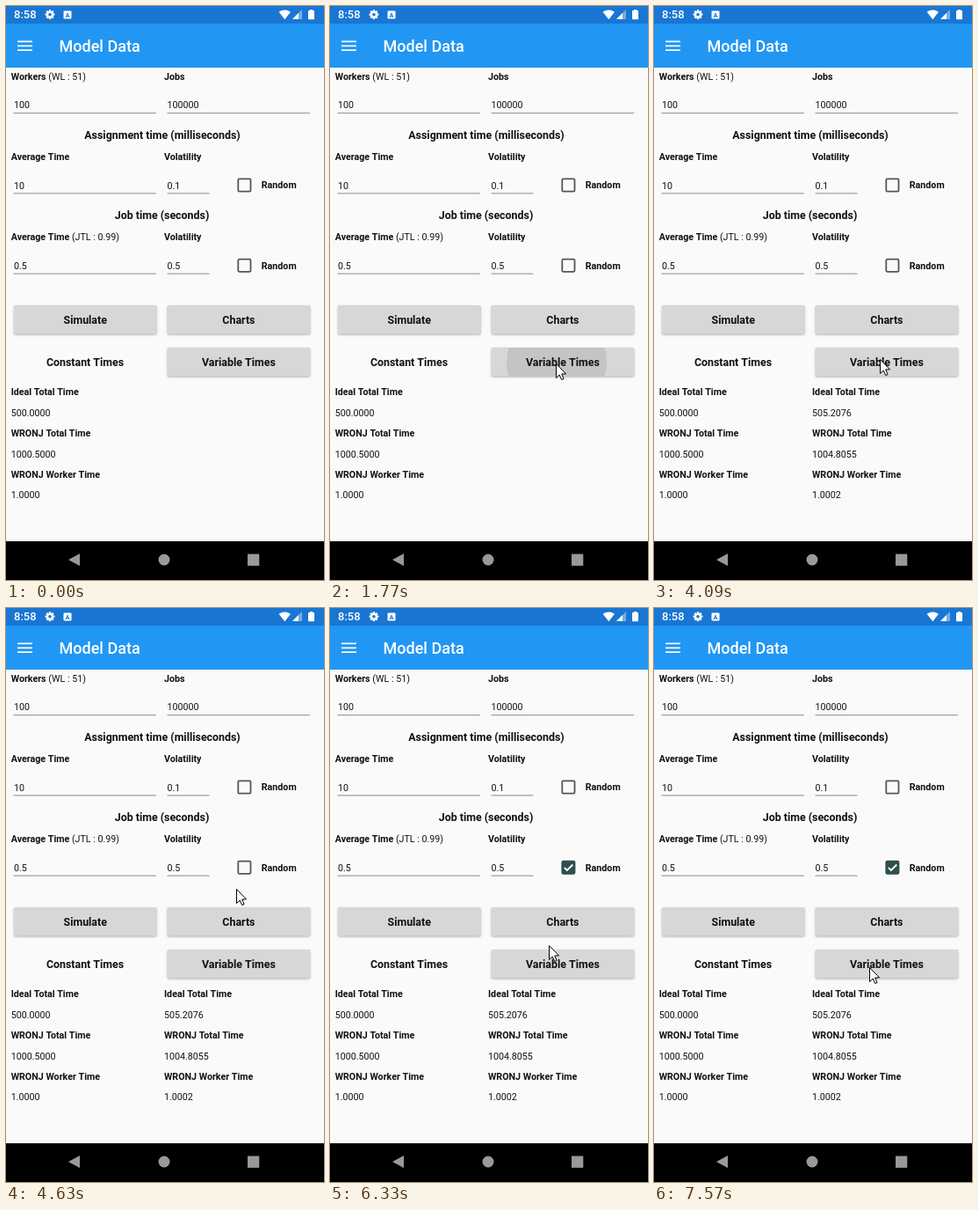
An HTML page with a canvas for the animation above (8 s loop, 362x652 px).

```html
<!DOCTYPE html>
<html lang="en">
<head>
<meta charset="utf-8">
<title>Model Data</title>
<style>
  html, body { margin: 0; width: 100%; height: 100%; overflow: hidden; background: #fafafa; }
  canvas { display: block; width: 362px; height: 652px; }
</style>
</head>
<body>
<canvas id="stage" width="362" height="652"></canvas>
<script>
const ctx = document.getElementById('stage').getContext('2d');
const LOOP = 8000;
const STEP = 77;
const INK = '#111';
const SMALL = 10.7, LARGE = 12.4;

// Pointer moves: start time, then [time, x, y] points sampled once per STEP.
const MOVES = [
  { start: 590, keys: [[590, 338, 358], [740, 307, 374], [900, 272, 396], [1050, 257, 406]] },
  { start: 4090, keys: [[4013, 257, 406], [4170, 256, 395], [4400, 257, 362], [4630, 262, 319], [4860, 269, 293]] },
  { start: 4940, keys: [[4940, 270, 291]] },
  { start: 5710, keys: [[5640, 270, 291], [5870, 267, 308], [6020, 262, 334], [6172, 254, 360], [6410, 247, 395], [6557, 245, 412]] },
  { start: 6790, keys: [[6790, 245, 410], [6867, 245, 408]] }
];
const CLICKS = [
  { from: 1600, to: 1680, x: 257, y: 406 },
  { from: 5240, to: 5410, x: 270, y: 291 },
  { from: 7020, to: 7190, x: 245, y: 408 }
];
// Each ripple lists [time, radius, darkness].
const RIPPLES = [
  { x: 258, end: 2080, keys: [[1680, 28, .09], [1770, 57, .09], [1840, 80, .08], [1920, 120, .05]] },
  { x: 245, end: 7570, keys: [[7190, 50, .09], [7270, 80, .08], [7340, 120, .05]] }
];

function text(str, x, y, size = SMALL, weight = 400, align = 'left', color = INK) {
  ctx.font = `${weight} ${size}px Roboto, sans-serif`;
  ctx.textAlign = align;
  ctx.fillStyle = color;
  ctx.fillText(str, x, y);
  return ctx.measureText(str).width;
}

const bold = (str, x, y) => text(str, x, y, SMALL, 700);
const heading = (str, x, y) => text(str, x, y, LARGE, 700, 'center');

function rect(x, y, w, h, color) {
  ctx.fillStyle = color;
  ctx.fillRect(x, y, w, h);
}

function roundRect(x, y, w, h, r) {
  ctx.beginPath();
  ctx.roundRect(x, y, w, h, r);
}

function polygon(points, color) {
  ctx.beginPath();
  points.forEach(([x, y]) => ctx.lineTo(x, y));
  ctx.closePath();
  ctx.fillStyle = color;
  ctx.fill();
}

function disc(x, y, r, color) {
  ctx.beginPath();
  ctx.arc(x, y, r, 0, Math.PI * 2);
  ctx.fillStyle = color;
  ctx.fill();
}

function line(points, color, width) {
  ctx.beginPath();
  points.forEach(([x, y]) => ctx.lineTo(x, y));
  ctx.strokeStyle = color;
  ctx.lineWidth = width;
  ctx.stroke();
}

function gear(x, y) {
  for (let i = 0; i < 8; i++) {
    const a = i * Math.PI / 4;
    line([[x, y], [x + 5.4 * Math.cos(a), y + 5.4 * Math.sin(a)]], '#fff', 2.2);
  }
  disc(x, y, 4.3, '#fff');
  disc(x, y, 1.8, '#1976d2');
}

function statusBar() {
  rect(0, 0, 362, 20, '#1976d2');
  text('8:58', 9, 14.3, 13, 500, 'left', '#fff');
  gear(50, 9.7);
  roundRect(65.5, 5.5, 9, 9, 1);
  ctx.fillStyle = '#fff';
  ctx.fill();
  text('A', 70, 12.7, 7.5, 700, 'center', '#1976d2');

  ctx.beginPath();
  ctx.moveTo(317.3, 15.3);
  ctx.lineTo(310.6, 6.8);
  ctx.quadraticCurveTo(317.3, 2, 324, 6.8);
  ctx.fillStyle = '#fff';
  ctx.fill();

  polygon([[326, 15], [337, 15], [337, 4]], 'rgba(255,255,255,.4)');
  polygon([[326, 15], [333, 15], [333, 8]], '#fff');
  rect(346, 4, 3, 2, '#fff');
  roundRect(344, 5, 7, 10.3, .8);
  ctx.fill();
}

function appBar() {
  rect(0, 20, 362, 50, '#2196f3');
  [39.5, 44.5, 49.3].forEach(y => rect(13, y, 17, 1.7, '#fff'));
  text('Model Data', 60.5, 52, 18, 500, 'left', '#fff');
}

function navBar() {
  rect(0, 608, 362, 44, '#000');
  polygon([[71, 629], [84, 622], [84, 636]], '#999');
  disc(180, 629, 6.5, '#999');
  rect(275, 622.5, 13.3, 13.3, '#999');
}

function field(str, x, y, w) {
  text(str, x, y);
  rect(x - (x < 100 ? .5 : 0), y + 4.8, w, 1, '#8a8a8a');
}

function button(label, x, y, ripple) {
  ctx.save();
  ctx.shadowColor = 'rgba(0,0,0,.3)';
  ctx.shadowBlur = 2.5;
  ctx.shadowOffsetY = 1;
  roundRect(x, y, 162.5, 32.5, 1.8);
  ctx.fillStyle = '#d6d7d7';
  ctx.fill();
  ctx.restore();
  if (ripple) {
    ctx.save();
    roundRect(x, y, 162.5, 32.5, 1.8);
    ctx.clip();
    disc(ripple.x, y + 17, ripple.radius, `rgba(0,0,0,${ripple.dark})`);
    ctx.restore();
  }
  heading(label, x + 81.2, y + 20.6);
}

function checkbox(y, progress) {
  const x = 264.3;
  roundRect(x, y, 14.2, 14.2, 1.2);
  ctx.strokeStyle = progress > 0 ? '#2f4f4f' : '#555';
  ctx.lineWidth = 1.8;
  ctx.stroke();
  if (progress > 0) {
    ctx.save();
    ctx.clip();
    ctx.lineWidth = 2 + 14 * Math.min(1, progress * 1.6);
    ctx.stroke();
    ctx.restore();
    if (progress > .6) line([[x + 2.5, y + 7.2], [x + 5.6, y + 10.3], [x + 12, y + 3.9]], '#fff', 1.8);
  }
  bold('Random', 290.8, y + 11);
}

function results(lines, x) {
  lines.forEach((str, i) => {
    const y = 442.4 + i * 23.4;
    /^\d/.test(str) ? text(str, x, y) : bold(str, x, y);
  });
}

function withLabels(values) {
  const labels = ['Ideal Total Time', 'WRONJ Total Time', 'WRONJ Worker Time'];
  return values.flatMap((value, i) => [labels[i], value]);
}

function form(t) {
  let w = bold('Workers', 5.7, 84);
  text(' (WL : 51)', 5.7 + w, 84);
  bold('Jobs', 180, 84);
  field('100', 9, 116.4, 162.5);
  field('100000', 183.5, 116.4, 162.5);

  heading('Assignment time (milliseconds)', 178, 151.2);
  bold('Average Time', 5.7, 175.2);
  bold('Volatility', 180, 175.2);
  field('10', 9, 207.6, 162.5);
  field('0.1', 183.5, 207.6, 48);
  checkbox(196.4, 0);

  heading('Job time (seconds)', 177.5, 242.2);
  w = bold('Average Time', 5.7, 266.4);
  text(' (JTL : 0.99)', 5.7 + w, 266.4);
  bold('Volatility', 180, 266.4);
  field('0.5', 9, 298.8, 162.5);
  field('0.5', 183.5, 298.8, 48);
  checkbox(287.6, t < 5410 ? 0 : Math.min(1, (t - 5330) / 300));

  button('Simulate', 9, 340);
  button('Charts', 183.7, 340);
  heading('Constant Times', 90, 408.6);
  button('Variable Times', 183.7, 388, rippleAt(t));

  results(withLabels(['500.0000', '1000.5000', '1.0000']), 5.7);
  const values = ['505.2076', '1004.8055', '1.0002'];
  if (t >= 3080) results(t < 3160 ? values : withLabels(values), 180);
}

function rippleAt(t) {
  for (const { x, end, keys } of RIPPLES) {
    const key = keys.filter(k => k[0] <= t).pop();
    if (key && t < end) return { x, radius: key[1], dark: key[2] };
  }
  return null;
}

function pointerAt(t) {
  const move = MOVES.filter(m => m.start <= t).pop();
  if (!move) return null;
  const { start, keys } = move;
  const time = start + Math.floor((t - start + 2) / STEP) * STEP;
  const next = keys.findIndex(k => k[0] > time);
  if (next < 0) return keys[keys.length - 1].slice(1);
  const [t0, x0, y0] = keys[next - 1];
  const [t1, x1, y1] = keys[next];
  const p = (time - t0) / (t1 - t0);
  return [Math.round(x0 + (x1 - x0) * p), Math.round(y0 + (y1 - y0) * p)];
}

function pointer([x, y]) {
  ctx.save();
  ctx.translate(x + .5, y + .5);
  polygon([[0, 0], [0, 16], [3.7, 12.5], [6.2, 18], [8.6, 17], [6.2, 11.5], [11, 11.3]], '#fff');
  ctx.strokeStyle = '#000';
  ctx.lineWidth = 1;
  ctx.stroke();
  ctx.restore();
}

function draw(t) {
  rect(0, 0, 362, 652, '#fafafa');
  statusBar();
  appBar();
  form(t);
  navBar();
  const click = CLICKS.find(c => t >= c.from && t < c.to);
  if (click) disc(click.x, click.y, 12, 'rgba(235,228,20,.65)');
  const position = pointerAt(t);
  if (position) pointer(position);
}

const begin = performance.now();
function frame() {
  draw((performance.now() - begin) % LOOP);
  requestAnimationFrame(frame);
}
frame();
</script>
</body>
</html>
```
